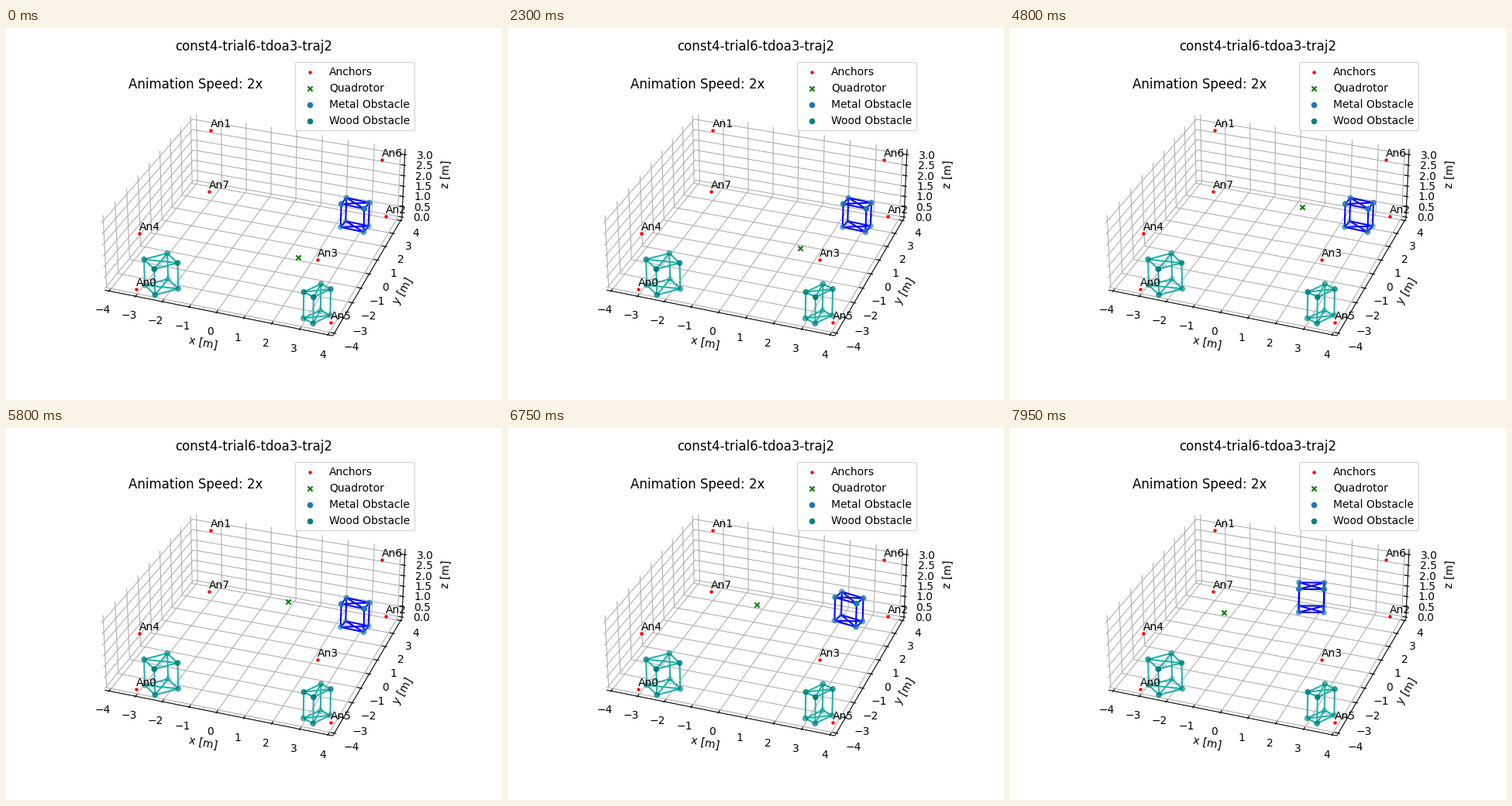
These frames come from a looping animation (640 by 480 pixels, 8 s). A matplotlib script:

```python
import numpy as np
import matplotlib.pyplot as plt
from matplotlib.animation import FuncAnimation
from matplotlib.collections import LineCollection
from matplotlib.colors import to_rgba

W, H, DPI = 640, 480, 100
FRAMES, STEP = 160, 50

plt.rcParams["font.family"] = "DejaVu Sans"
plt.rcParams["font.size"] = 10

fig = plt.figure(figsize=(W / DPI, H / DPI), dpi=DPI, facecolor="white")
ax = fig.add_axes([0, 0, 1, 1])
ax.set_xlim(0, W)
ax.set_ylim(H, 0)
ax.axis("off")

# ---- perspective camera -------------------------------------------------
AZIM, ELEV = np.radians(-70), np.radians(30)
DIST, FOCAL = 63.71, 2311
CX, CY = 325.5, 245.1
EYE = np.array([np.cos(ELEV) * np.cos(AZIM), np.cos(ELEV) * np.sin(AZIM), np.sin(ELEV)])
RIGHT = np.array([-np.sin(AZIM), np.cos(AZIM), 0])
UP = np.cross(EYE, RIGHT)

XY = 4 + 1 / 6
Z0, Z1 = -1 / 15, 3.2 + 1 / 15
ZMID = 1.6


def proj(x, y, z):
    """Room position in metres to stage pixels."""
    p = np.array([x, y, (z - ZMID) * 0.875])
    k = FOCAL / (DIST - p @ EYE)
    return CX + k * (p @ RIGHT), CY - k * (p @ UP)


def path(*pts):
    return [proj(*p) for p in pts]


# ---- grid, axes, ticks --------------------------------------------------
xy_ticks = range(-4, 5)
z_ticks = np.arange(0, 3.01, 0.5)

grid = [path((v, -XY, Z0), (v, XY, Z0), (v, XY, Z1)) for v in xy_ticks]
grid += [path((XY, v, Z0), (-XY, v, Z0), (-XY, v, Z1)) for v in xy_ticks]
grid += [path((-XY, -XY, v), (-XY, XY, v), (XY, XY, v)) for v in z_ticks]
ax.add_collection(LineCollection(grid, colors="#b0b0b0", linewidths=0.8, zorder=1))

edges = [
    path((-XY, -XY, Z0), (XY, -XY, Z0)),
    path((XY, -XY, Z0), (XY, XY, Z0)),
    path((XY, XY, Z0), (XY, XY, Z1)),
]
OUT, IN = XY + 0.067, XY - 0.133
ticks = [path((v, -OUT, Z0), (v, -IN, Z0)) for v in xy_ticks]
ticks += [path((OUT, v, Z0), (IN, v, Z0)) for v in xy_ticks]
ticks += [path((OUT, XY, v), (IN, XY, v)) for v in z_ticks]
ax.add_collection(LineCollection(edges + ticks, colors="black", linewidths=0.8, zorder=1.5))


def beside(axis, v, pad):
    """Pixel spot for a label at value v, pushed off its axis."""
    out, low = XY + pad, Z0 - 0.4 * pad
    return proj(*{"x": (v, -out, low), "y": (out, v, low), "z": (out, out, v)}[axis])


def tick_text(axis, v, s):
    ax.text(*beside(axis, v, 0.594), s, ha="center", va="top")


for v in xy_ticks:
    for axis in "xy":
        tick_text(axis, v, str(v).replace("-", "\u2212"))
for v in z_ticks:
    tick_text("z", v, f"{v:.1f}")

for axis, mid, (a, b) in zip("xyz", (0, 0, ZMID), edges):
    angle = np.degrees(np.arctan2(a[1] - b[1], b[0] - a[0]))
    ax.text(*beside(axis, mid, 1.27), f"{axis} [m]", ha="center", va="center",
            rotation=angle, rotation_mode="anchor")

# ---- titles and anchors -------------------------------------------------
ax.text(320, 29, "const4-trial6-tdoa3-traj2", fontsize=12, ha="center")
ax.text(157.5, 78, "Animation Speed: 2x", fontsize=12)

anchors = [(168, 337), (264, 132), (490, 243), (402, 299),
           (172, 265), (419, 380), (485, 170), (262, 211)]
red = ax.scatter(*(np.array(anchors).T + 0.3), s=4, color="red", linewidths=1.2, zorder=6)
for i, (x, y) in enumerate(anchors):
    ax.text(x - 0.5, y - 3.6, f"An{i}", zorder=7)

# ---- obstacles ----------------------------------------------------------
LEVEL = [(0, 1), (1, 2), (2, 3), (3, 0), (0, 2), (1, 3)]
PAIRS = LEVEL + [(i + 4, j + 4) for i, j in LEVEL] + [(i, i + 4) for i in range(4)]
TILT = np.sin(ELEV)


class Box:
    def __init__(self, color, edge, width, depth, height):
        self.color, self.size, self.height = to_rgba(color), (width, depth), height
        self.lines = LineCollection([], colors=edge, linewidths=1.5, zorder=2)
        ax.add_collection(self.lines)
        self.dots = ax.scatter([0] * 8, [0] * 8, s=20, linewidths=1, zorder=4)

    def place(self, x, y, turn):
        """Put the back top corner at x, y with the sides turned by an angle."""
        t = np.radians(turn)
        a = self.size[0] * np.array([np.cos(t), TILT * np.sin(t)])
        b = self.size[1] * np.array([-np.sin(t), TILT * np.cos(t)])
        top = np.array([x, y]) + [0 * a, a, a + b, b]
        pts = np.vstack([top, top + [(CX - x) * 0.008, self.height]])
        self.lines.set_segments([pts[[i, j]] for i, j in PAIRS])
        # farther corners fade
        near = np.tile(top[:, 1], 2) / np.tan(ELEV)
        near[:4] += self.height * np.tan(ELEV)
        order = np.argsort(near)
        rgba = np.tile(self.color, (8, 1))
        rgba[:, 3] = 1 - 0.7 * (near.max() - near) / np.ptp(near)
        self.dots.set_offsets(pts[order])
        self.dots.set_facecolor(rgba[order])
        self.dots.set_edgecolor(rgba[order])


METAL, WOOD, WOOD_EDGE = "#1f77b4", "teal", "lightseagreen"
Box(WOOD, WOOD_EDGE, 28.4, 34, 33.3).place(208.2, 290.6, 62.3)
Box(WOOD, WOOD_EDGE, 18.3, 30.5, 33.9).place(406.4, 330.2, 46.5)
metal = Box(METAL, "blue", 32.2, 16.8, 30)
quad = ax.scatter([0], [0], s=20, marker="x", color="green", linewidths=1.5, zorder=6)


# ---- motion -------------------------------------------------------------
def since(t, start, soft):
    """Time passed after start, with a soft beginning."""
    return soft * np.logaddexp(0, (t - start) / soft)


def quad_pos(t):
    climb = 0.0216 * (since(t, 1748, 174) - since(t, 5155, 200))
    slide = 0.0465 * (since(t, 5540, 150) - since(t, 7740, 150))
    sink = 0.0088 * since(t, 6200, 300)
    return 376.8 - slide, 296.4 - climb + sink


def metal_pose(t):
    u = max(0, (t - 5950) / 2000)
    return 439.2 - 66 * u ** 2.25, 219.2 - 19.8 * u, 23 + 48 * u - 70 * u * u


def draw(i):
    t = i * STEP
    quad.set_offsets([quad_pos(t)])
    metal.place(*metal_pose(t))
    return quad, metal.lines, metal.dots


# ---- legend -------------------------------------------------------------
def key(color):
    return ax.scatter([], [], s=20, color=color, linewidths=1)


ax.legend([red, quad, key(METAL), key(WOOD)],
          ["Anchors", "Quadrotor", "Metal Obstacle", "Wood Obstacle"],
          loc="upper right", bbox_to_anchor=(533.7, 37.2),
          bbox_transform=ax.transData).set_zorder(8)

anim = FuncAnimation(fig, draw, frames=FRAMES, interval=STEP,
                     init_func=lambda: draw(0), repeat=True, repeat_delay=0)
plt.show()
```
